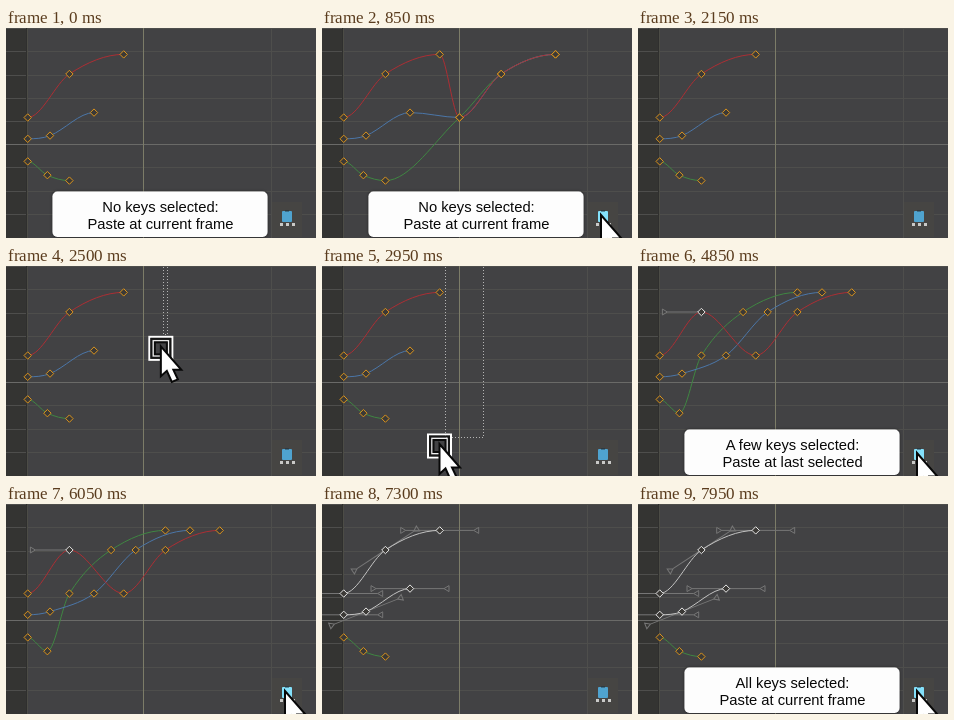
Write an HTML page that moves like this. It is 310 by 210 pixels and loops after 8 s.

```html
<!DOCTYPE html>
<html lang="en">
<head>
<meta charset="utf-8">
<title>Pasting curve keys</title>
<style>
html, body { margin: 0; width: 310px; height: 210px; overflow: hidden; background: #424244; }
svg { display: block; }
text { font: 14.75px "Liberation Sans", Arial, sans-serif; fill: #080808; text-anchor: middle; }
.crisp { shape-rendering: crispEdges; }
.line { fill: none; stroke-width: 1; }
</style>
</head>
<body>
<svg width="310" height="210" viewBox="0 0 310 210">
  <defs>
    <filter id="shadow" x="-5%" y="-15%" width="110%" height="130%">
      <feDropShadow dx="0" dy="0" stdDeviation="1.6" flood-color="#000" flood-opacity=".55"/>
    </filter>
  </defs>
  <rect width="310" height="210" fill="#424244"/>
  <g class="crisp">
    <rect width="20" height="210" fill="#343432"/>
    <g id="grid"></g>
    <rect x="20" width="1" height="210" fill="#2f2f2e"/>
    <rect x="21" width="1" height="210" fill="#4c4c46"/>
    <rect x="265" width="1" height="210" fill="#4e4e4c"/>
    <rect y="116" width="310" height="1" fill="#6a6a68"/>
    <rect x="137" width="1" height="210" fill="#7c7c68"/>
  </g>
  <g id="graph"></g>
  <g class="crisp">
    <rect x="266" y="174" width="30" height="35" fill="#464543"/>
    <rect id="press" x="268" y="176" width="25" height="26" fill="#5b5b59"/>
  </g>
  <rect id="board" x="276" y="183" width="10" height="11" rx="1"/>
  <rect x="279" y="182" width="4" height="1.500" fill="#2c3a42"/>
  <path class="crisp" d="M274 195h3v3h-3zM280 195h3v3h-3zM286 195h3v3h-3z" fill="#c9c9c7"/>
  <path id="marquee" class="line crisp" stroke="#b4b4b4" stroke-dasharray="1 2"/>
  <g id="caption">
    <rect x="46.5" y="163.5" width="215" height="45.5" rx="5" fill="#fdfdfd" filter="url(#shadow)"/>
    <text id="title" x="154.5" y="184"></text>
    <text id="detail" x="154.5" y="201"></text>
  </g>
  <g id="cursor">
    <g id="target" fill="none" stroke-width="2">
      <rect x="-11.5" y="-11.5" width="23" height="23" stroke="#fff"/>
      <rect x="-9.5" y="-9.5" width="19" height="19" stroke="#161616"/>
      <rect x="-7.5" y="-7.5" width="15" height="15" stroke="#f0f0f0" stroke-width="1.500"/>
      <rect x="-6" y="-6" width="12" height="12" stroke="#0b0b0b"/>
    </g>
    <path d="M0-2V28L6 22.500L11 33.500L17 31L12.500 21.500H20.500Z" fill="#fff" stroke="#080808" stroke-width="2"/>
  </g>
</svg>
<script>
const LOOP = 8000, STEP = 50;
const el = id => document.getElementById(id);
const show = (id, on) => el(id).setAttribute('display', on ? 'inline' : 'none');

const red = [[21.7, 89.5], [63.4, 46], [117.7, 26.4]];
const blue = [[21.7, 110.8], [44, 107.6], [88, 84.6]];
const green = [[21.7, 133.4], [41.4, 147.2], [63.4, 152.6]];
const base = [green, blue, red];
const colors = ['#3f8642', '#4b76a8', '#ac2e34'];

// The copied red curve replaces everything from frame x on.
const paste = (keys, x) => [
  ...keys.filter(k => k[0] < x),
  ...red.map(k => [k[0] - red[0][0] + x, k[1]])
];
const atFrame = base.map(keys => paste(keys, 137.5));
const atLast = base.map(keys => paste(keys, keys[2][0]));

// Which key indices are selected, in green, blue, red order
const NONE = [[], [], []];
const FEW = [[2], [2], [1, 2]];
const KEPT = [[], [], [1]];
const FULL = [[], [0, 1, 2], [0, 1, 2]];

el('grid').innerHTML = [0, 23, 47, 70, 93, 139, 163, 186]
  .map(y => `<rect y="${y}" width="310" height="1" fill="#4e4e4c"/>`).join('');

function slope(keys, i) {
  const a = keys[i - 1], b = keys[i], c = keys[i + 1];
  if (!a || !c || (b[1] - a[1]) * (c[1] - b[1]) <= 0) return 0;
  return (c[1] - a[1]) / (c[0] - a[0]);
}

function segment(keys, i, color) {
  const [x, y] = keys[i], [u, v] = keys[i + 1], d = (u - x) / 3;
  return `<path class="line" stroke="${color}" d="M${x} ${y}C${x + d} ${y + d * slope(keys, i)} ` +
    `${u - d} ${v - d * slope(keys, i + 1)} ${u} ${v}"/>`;
}

function handle([x, y], m, side) {
  const angle = Math.atan(m) * 180 / Math.PI + (side < 0 ? 180 : 0);
  return `<path class="line" stroke="#767676" stroke-width=".8" ` +
    `transform="translate(${x} ${y}) rotate(${angle})" d="M0 0H34M34 0L39-3V3Z"/>`;
}

const diamond = ([x, y], on) =>
  `<path d="M${x - 3.7} ${y}l3.7-3.7 3.7 3.7-3.7 3.7z" fill="#3b3936" ` +
  `stroke="${on ? '#e6e6e6' : '#dc941c'}"/>`;

function drawGraph(curves, picked, sides) {
  let lines = '', handles = '', marks = '';
  curves.forEach((keys, c) => keys.forEach((key, i) => {
    const on = picked[c].includes(i);
    if (i < keys.length - 1) {
      const both = on && picked[c].includes(i + 1);
      lines += segment(keys, i, both ? '#c2c2c2' : colors[c]);
    }
    if (on) handles += sides.map(s => handle(key, slope(keys, i), s)).join('');
    marks += diamond(key, on);
  }));
  el('graph').innerHTML = handles + lines + marks;
}

function graphAt(t) {
  if (t >= 7300) return [base, FULL, [-1, 1]];
  if (t >= 6600) return [base, NONE, []];
  if (t >= 4850) return [atLast, KEPT, [-1]];
  if (t >= 3600) return [base, FEW, [-1, 1]];
  if (t >= 850 && t < 2150) return [atFrame, NONE, []];
  return [base, NONE, []];
}

function captionAt(t) {
  if (t < 2150) return ['No keys selected:', 'Paste at current frame'];
  if (t >= 3900 && t < 6050) return ['A few keys selected:', 'Paste at last selected'];
  if (t >= 7500) return ['All keys selected:', 'Paste at current frame'];
  return null;
}

const drags = [
  { from: 2250, stop: 3350, end: 3600, span: 700, dx: -43.5, dy: 220, px: 1.9, py: 0.57 },
  { from: 6650, stop: 7250, end: 7300, span: 600, dx: -155, dy: 161, px: 1.6, py: 0.6 }
];
function dragPoint(d, t) {
  const u = Math.max(0, Math.min(t, d.stop) - d.from) / d.span;
  return [161 + d.dx * u ** d.px, -40 + d.dy * u ** d.py];
}

const visits = [
  { from: 450, click: 750, end: 1200 },
  { from: 4400, click: 4750, end: 6600 },
  { from: 7650, click: 8050, end: 8000 }
];
const during = (list, t) => list.find(s => t >= s.from && t < s.end);

function render(t) {
  drawGraph(...graphAt(t));

  const words = captionAt(t);
  show('caption', words);
  if (words) [el('title').textContent, el('detail').textContent] = words;

  const drag = during(drags, t), visit = during(visits, t);
  let pos = null, hover = false;
  if (drag) {
    pos = dragPoint(drag, t);
    const [x, y] = dragPoint(drag, t - STEP).map(v => Math.round(v) + 0.5);
    el('marquee').setAttribute('d', `M161.500-50V${y}H${x}V-50`);
  }
  if (visit) {
    const u = Math.min(1, (t - visit.from + STEP) / 250);
    pos = [279, 211 - 22 * u * (2 - u)];
    hover = u > 0.6;
  }
  show('marquee', drag);
  show('target', drag);
  show('cursor', pos);
  show('press', visit && t >= visit.click && t < visit.click + 100);
  if (pos) el('cursor').setAttribute('transform', `translate(${pos})`);
  el('board').setAttribute('fill', hover ? '#83e0fa' : '#4fa3cf');
}

let last = -1;
const start = performance.now();
function tick() {
  const t = Math.floor((performance.now() - start) % LOOP / STEP) * STEP;
  if (t !== last) render(last = t);
  requestAnimationFrame(tick);
}
tick();
</script>
</body>
</html>
```
